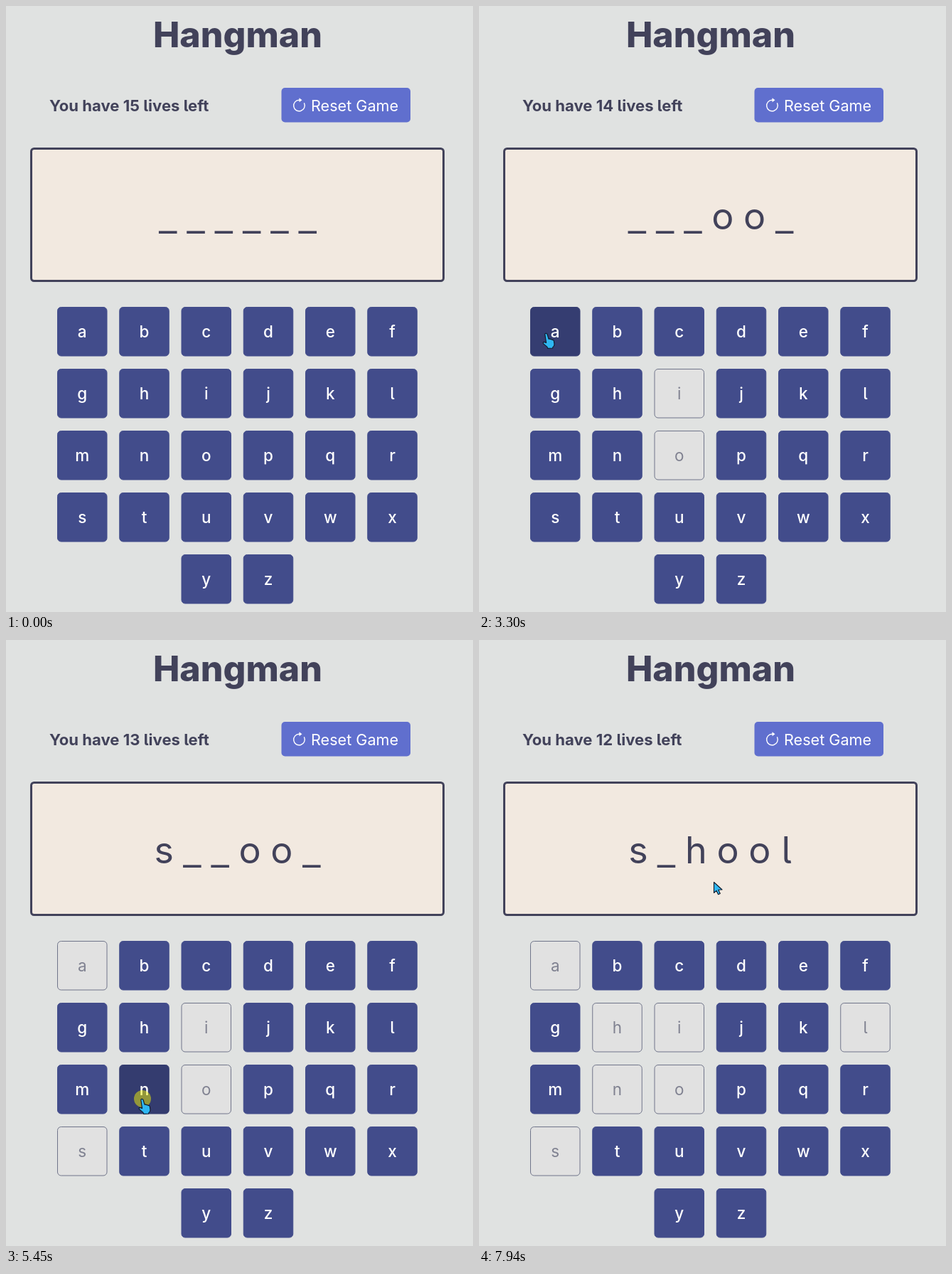
An HTML page for the animation above (8 s loop, 657 by 852 pixels).

```html
<!DOCTYPE html>
<html lang="en">
<head>
<meta charset="utf-8">
<title>Hangman</title>
<style>
  html, body { margin: 0; width: 100%; height: 100%; overflow: hidden; background: #e0e2e1; }
  svg { display: block; width: 100%; height: 100%; }
  text { font-family: Inter, "Noto Sans", sans-serif; fill: #42425a; font-feature-settings: "cv05"; }
  .title { font-size: 50px; font-weight: 800; }
  .lives { font-size: 22.1px; font-weight: 700; }
  .light { font-size: 21.6px; fill: #fff; }
  .key text { font-size: 22.5px; font-weight: 500; fill: #fff; }
  .key.off text { font-weight: 400; fill: #808291; }
  #word text { font-size: 52px; }
  #word rect { fill: #42425a; }
  .cursor { fill: #2fb7f3; stroke: #101828; stroke-width: 1.1; stroke-linejoin: round; }
</style>
</head>
<body>
<svg viewBox="0 0 657 852">
  <text class="title" x="326" y="58" text-anchor="middle">Hangman</text>
  <text class="lives" x="61" y="148">You have <tspan id="lives">15</tspan> lives left</text>
  <rect x="387.5" y="115" width="181.5" height="48.5" rx="5" fill="#606fce"/>
  <g transform="translate(412.5 140)">
    <path d="M0 -7.8A7.8 7.8 0 1 0 7.1 -3.2" fill="none" stroke="#fff" stroke-width="1.4" stroke-linecap="round"/>
    <path d="M0 -10.8L4 -7.8L0 -4.8Z" fill="#fff"/>
  </g>
  <text class="light" x="429" y="148">Reset Game</text>
  <rect x="35.5" y="200.5" width="580" height="186" rx="4" fill="#f2e9e0" stroke="#42425a" stroke-width="3"/>
  <g id="word"></g>
  <g id="keys"></g>
  <circle id="click" r="12" fill="#ff0" opacity=".47"/>
  <g id="pointer">
    <path id="hand" class="cursor" d="M-2.2 1.8Q-2 0 -.4 .3Q.8 .6 1.2 2L3 8.2Q4.6 7.4 5.5 8.8Q7 8 7.9 9.6Q9.7 9 10.3 10.8L11 15.4Q11 18 9 19.4L8.6 21L1.6 21.4L1 19.4L-4.6 14.6Q-5.4 12.6 -3.4 12.4L-.4 13.6Z"/>
    <path id="arrow" class="cursor" d="M.5 .5V15.5L4 12.4L6.6 17.7L9.3 16.4L6.8 11.3L12 11Z"/>
  </g>
</svg>
<script>
const LOOP = 8000, ENTER = 310, HOVER_FADE = 150, OFF_FADE = 110;
const KEY = { w: 70.5, h: 69.5, dx: 87.25, dy: 87, left: 72, top: 423 };
const BLUE = [66, 76, 139], DARK = [52, 60, 111], GREY = [225, 225, 225], EDGE = [112, 117, 138];

// Each guess: press time, time the key turns off, time the result shows.
const guesses = [
  { letter: "o", press: 1670, off: 1810, shown: 1880, word: "___oo_" },
  { letter: "i", press: 2620, off: 2760, shown: 2830, lives: 14 },
  { letter: "a", press: 3630, off: 3710, shown: 3770, lives: 13 },
  { letter: "s", press: 4570, off: 4700, shown: 4840, word: "s__oo_" },
  { letter: "n", press: 5380, off: 5500, shown: 5570, lives: 12 },
  { letter: "h", press: 6110, off: 6250, shown: 6320, word: "s_hoo_" },
  { letter: "l", press: 7130, off: 7270, shown: 7340, word: "s_hool" },
];

// Pointer path: time, x, y
const path = [
  [310, 408, 720], [450, 345, 690], [580, 222, 640], [700, 212, 571], [850, 259, 597],
  [920, 268, 599], [1060, 274, 614], [1200, 274, 616], [1880, 274, 616], [2210, 283, 561],
  [2830, 283, 561], [3140, 66, 482], [3300, 95, 460], [4050, 95, 460], [4500, 107, 705],
  [4780, 107, 705], [4840, 111, 696], [4980, 150, 674], [5120, 192, 645], [5590, 192, 645],
  [5860, 199, 528], [6320, 199, 528], [6860, 526, 556], [6930, 520, 556], [7400, 520, 556],
  [7890, 330, 331], [7940, 330, 340],
];

const glyphWidth = { _: 25.6, s: 26, h: 31, o: 31, l: 17 }, GAP = 13.7;
const $ = id => document.getElementById(id);
const clamp = v => Math.min(1, Math.max(0, v));
const mix = (a, b, k) => a.map((v, i) => v + (b[i] - v) * k);
const rgb = color => `rgb(${color.map(Math.round)})`;

function add(parent, tag, attributes, content = "") {
  const node = document.createElementNS("http://www.w3.org/2000/svg", tag);
  for (const name in attributes) node.setAttribute(name, attributes[name]);
  node.textContent = content;
  return parent.appendChild(node);
}

const keys = [..."abcdefghijklmnopqrstuvwxyz"].map((letter, i) => {
  const x = KEY.left + KEY.dx * (i % 6 + (i > 23 ? 2 : 0));
  const y = KEY.top + KEY.dy * Math.floor(i / 6);
  const group = add($("keys"), "g", { class: "key" });
  const rect = add(group, "rect", { x: x + .5, y: y + .5, width: KEY.w - 1, height: KEY.h - 1, rx: 5 });
  add(group, "text", { x: x + KEY.w / 2, y: y + 43, "text-anchor": "middle" }, letter);
  const guess = guesses.find(g => g.letter === letter);
  return { x, y, group, rect, off: guess ? guess.off : Infinity };
});

function pointerAt(t) {
  const next = path.findIndex(p => p[0] > t);
  if (next < 1) return path[next ? path.length - 1 : 0].slice(1);
  const a = path[next - 1], b = path[next];
  return mix(a, b, (t - a[0]) / (b[0] - a[0])).slice(1);
}

function hoveredAt(t) {
  if (t < ENTER) return;
  const [x, y] = pointerAt(t);
  return keys.find(k => t < k.off && x >= k.x && x <= k.x + KEY.w && y >= k.y && y <= k.y + KEY.h);
}

let currentWord;
function showWord(word) {
  if (word === currentWord) return;
  currentWord = word;
  $("word").replaceChildren();
  const total = [...word].reduce((sum, c) => sum + glyphWidth[c] + GAP, -GAP);
  let x = 326 - total / 2;
  for (const c of word) {
    const width = glyphWidth[c];
    if (c === "_") add($("word"), "rect", { x, y: 316.3, width, height: 3.7 });
    else add($("word"), "text", { x: x + width / 2, y: 314, "text-anchor": "middle" }, c);
    x += width + GAP;
  }
}

function render(t) {
  const state = { word: "______", lives: 15 };
  for (const g of guesses) if (t >= g.shown) {
    state.word = g.word || state.word;
    state.lives = g.lives || state.lives;
  }
  showWord(state.word);
  $("lives").textContent = state.lives;

  // The share of recent time spent hovering gives a linear colour fade.
  const samples = 12;
  const recent = Array.from({ length: samples }, (_, i) => hoveredAt(t - i * HOVER_FADE / samples));
  for (const key of keys) {
    const off = t >= key.off;
    const hover = recent.filter(k => k === key).length / samples;
    const color = off ? mix(DARK, GREY, clamp((t - key.off) / OFF_FADE)) : mix(BLUE, DARK, hover);
    key.rect.setAttribute("fill", rgb(color));
    key.rect.setAttribute("stroke", rgb(off ? EDGE : color));
    key.group.classList.toggle("off", off);
  }

  const [x, y] = pointerAt(t);
  const overKey = Boolean(recent[0]);
  const pressed = guesses.some(g => t >= g.press && t < g.press + 100);
  const show = (id, visible) => $(id).setAttribute("visibility", visible ? "visible" : "hidden");
  $("pointer").setAttribute("transform", `translate(${x} ${y})`);
  $("click").setAttribute("transform", `translate(${x} ${y})`);
  show("hand", t >= ENTER && overKey);
  show("arrow", t >= ENTER && !overKey);
  show("click", pressed);
}

function frame() {
  render(performance.now() % LOOP);
  requestAnimationFrame(frame);
}
frame();
</script>
</body>
</html>
```
